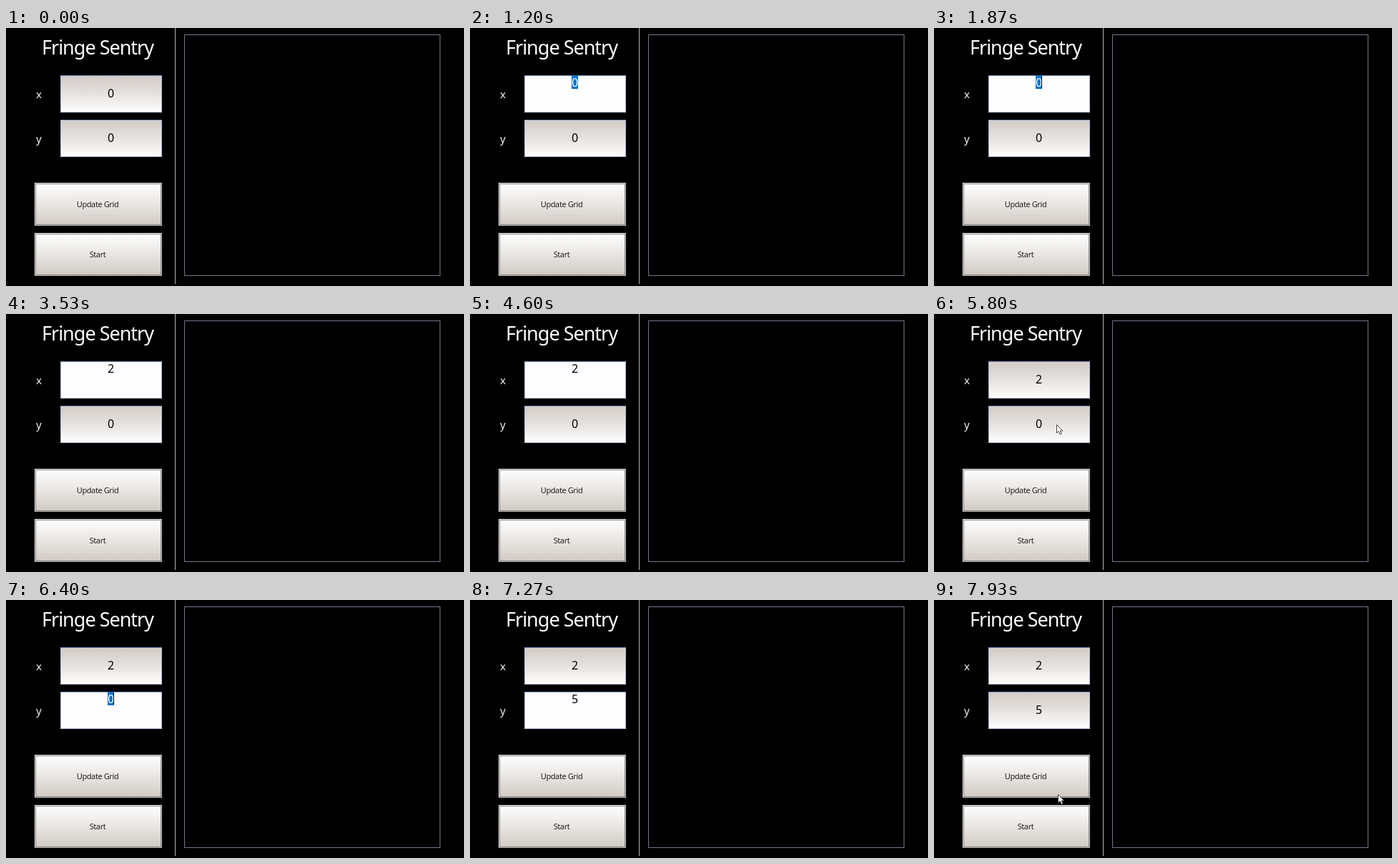
Recreate the animation shown at these times as an HTML page with a canvas. Size 640 px wide and 360 px high, loop 8000 ms.

```html
<!DOCTYPE html>
<html lang="en">
<head>
<meta charset="utf-8">
<title>Grid setup</title>
<style>
  html, body { margin: 0; height: 100%; overflow: hidden; background: #000; }
  canvas { display: block; }
</style>
</head>
<body>
<canvas id="stage" width="640" height="360"></canvas>
<script>
const ctx = document.getElementById("stage").getContext("2d");
const LOOP = 8000, TICK = LOOP / 120;   // the screen refreshes 15 times a second
const BLINK = 8;                        // caret half period in ticks

// Times in ticks
const fields = [
  { label: "x", y: 66, focus: 18, typed: 45, blur: 76, value: "2" },
  { label: "y", y: 128, focus: 88, typed: 101, blur: 110, value: "5" }
];

// Pointer strokes: key points as [tick, x, y]; hidden outside each stroke
const strokes = [
  [[21, 188, 98], [24, 345, 215], [27, 549, 344]],
  [[80, 451, 318], [83, 310, 232], [86, 180, 158], [87, 171, 154]],
  [[89, 190, 166], [91, 380, 280], [92, 446, 323]],
  [[117, 247, 344], [118, 202, 298], [119, 173, 271]]
];

function text(str, x, y, size, color, spacing = 0, align = "center") {
  ctx.font = `${size}px "Noto Sans", "Open Sans", sans-serif`;
  ctx.letterSpacing = spacing + "px";
  ctx.textAlign = align;
  ctx.fillStyle = color;
  ctx.fillText(str, x, y);
}

function box(x, y, w, h, fill) {
  ctx.fillStyle = fill;
  ctx.fillRect(x, y, w, h);
}

function frame(x, y, w, h, color) {
  ctx.strokeStyle = color;
  ctx.lineWidth = 1;
  ctx.strokeRect(x + 0.5, y + 0.5, w - 1, h - 1);
}

function shade(y, h, ...colors) {
  const g = ctx.createLinearGradient(0, y, 0, y + h);
  colors.forEach((c, i) => g.addColorStop(i / (colors.length - 1), c));
  return g;
}

function drawField({ label, y, focus, typed, blur, value }, tick) {
  const editing = tick >= focus && tick < blur;
  const shown = tick >= typed ? value : "0";
  text(label, 42, y + 32, 15, "#f4f4f4", 0, "left");
  box(76, y, 142, 52, editing ? "#fdfdff" : shade(y, 52, "#d2cbc6", "#e6e2df", "#ffffff"));
  frame(76, y, 142, 52, "#a9b4cc");
  box(76, y, 142, 1, "#8299cc");
  if (!editing) {
    text(shown, 146.5, y + 31, 16, "#000");
    return;
  }
  // The caret starts dark over a selection and lit after typing
  const selected = tick < typed;
  if (selected) box(142, y, 9, 19, "#0c76cf");
  text(shown, 146.5, y + 15.5, 16, selected ? "#fff" : "#000");
  const since = selected ? tick - focus + BLINK : tick - typed;
  if (Math.floor(since / BLINK) % 2 === 0) box(150, y + 1, 1, 17, "#000");
}

function drawButton(label, y) {
  box(40, y, 178, 60, "#b8b6b3");
  box(40, y, 177, 59, "#f2f1ef");
  frame(41, y + 1, 176, 58, "#85827e");
  box(42, y + 2, 174, 56, shade(y, 59, "#ffffff", "#e9e6e3", "#d0cac3"));
  text(label, 128, y + 34, 11, "#222", -0.4);
}

function drawPointer(tick) {
  const path = strokes.find(s => tick >= s[0][0] && tick <= s[s.length - 1][0]);
  if (!path) return;
  const next = Math.max(1, path.findIndex(p => p[0] >= tick));
  const [a, b] = [path[next - 1], path[next]];
  const k = (tick - a[0]) / (b[0] - a[0]);
  ctx.save();
  ctx.translate(a[1] + (b[1] - a[1]) * k, a[2] + (b[2] - a[2]) * k);
  const arrow = new Path2D("M.5 .5V12L3.2 9.6L5.2 14L7.2 13.1L5.3 9H8.8Z");
  ctx.fillStyle = "#fff";
  ctx.strokeStyle = "#333";
  ctx.lineWidth = 0.9;
  ctx.fill(arrow);
  ctx.stroke(arrow);
  ctx.restore();
}

function draw(now) {
  const tick = Math.floor((now % LOOP + 4) / TICK) % 120;
  box(0, 0, 640, 360, "#000");
  text("Fringe Sentry", 128, 37, 27, "#fff", -1);
  box(236, 0, 1, 357, "#b4b2ac");
  frame(249, 9, 358, 337, "#74748a");
  fields.forEach(f => drawField(f, tick));
  drawButton("Update Grid", 216);
  drawButton("Start", 286);
  drawPointer(tick);
}

const start = performance.now();
function loop() {
  draw(performance.now() - start);
  requestAnimationFrame(loop);
}
loop();
</script>
</body>
</html>
```
